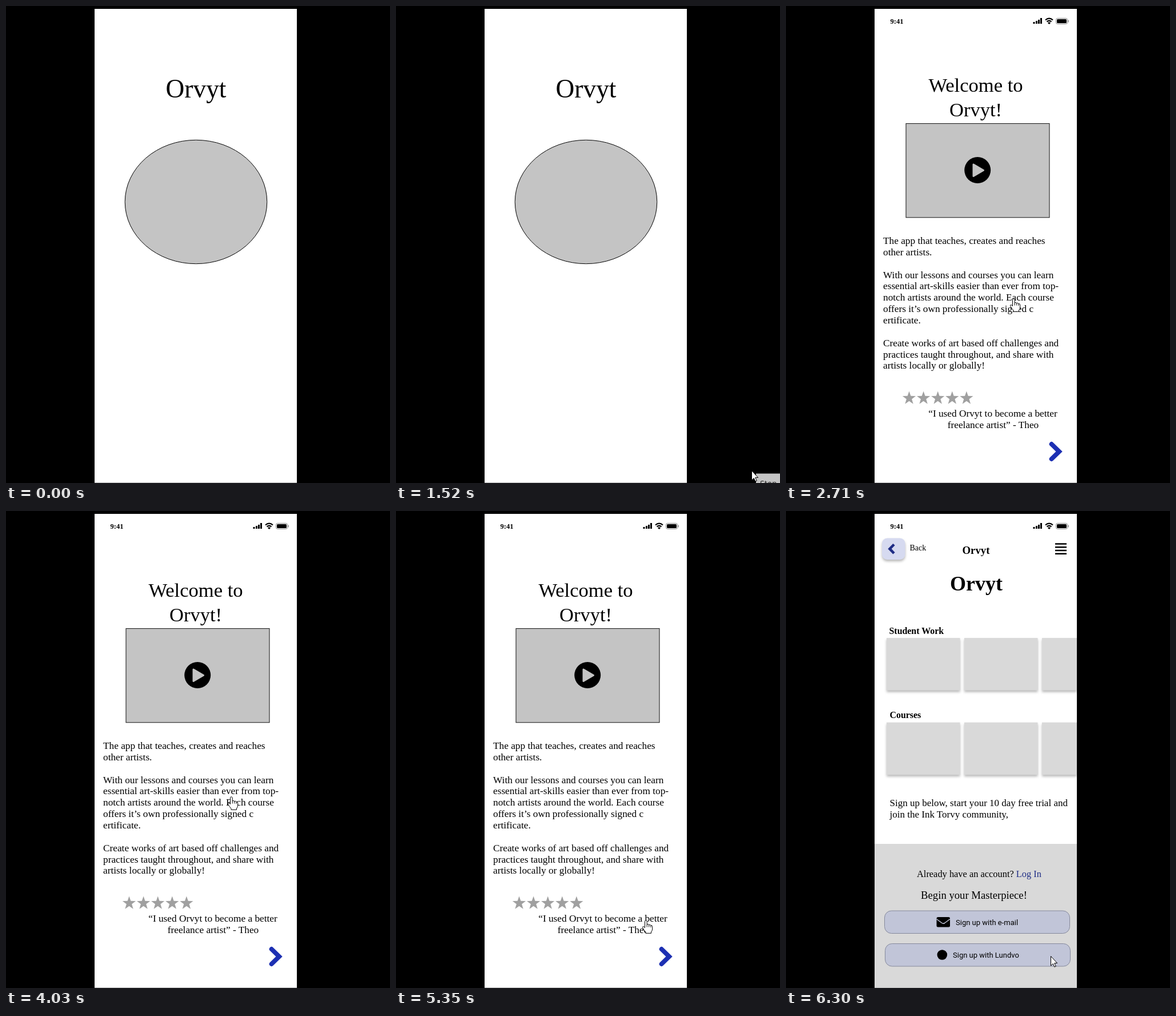
Recreate the animation shown at these times as an HTML page. Size 672x834 px, loop 8000 ms.

```html
<!DOCTYPE html>
<html lang="en">
<head>
<meta charset="utf-8">
<title>App prototype walkthrough</title>
<style>
  html, body { margin: 0; width: 100%; height: 100%; overflow: hidden; background: #000; }
  svg { display: block; width: 672px; height: 834px; }
  text { font-family: "Liberation Serif", "Times New Roman", serif; white-space: pre; }
  .body { font-size: 17.3px; }
  .mid { text-anchor: middle; }
  .bold { font-weight: bold; }
  .title { font-size: 34.6px; }
  .label { font: 13px Roboto, sans-serif; }
  .tip { font: 14px "Open Sans", sans-serif; }
  .tile { fill: #d9d9d9; filter: drop-shadow(0 3px 2px rgba(0, 0, 0, .28)); }
  .button { fill: #c1c5d8; stroke: #85899c; }
  .pointer { fill: #fff; stroke: #000; stroke-width: 1; stroke-linejoin: round; }
</style>
</head>
<body>
<svg viewBox="0 0 672 834">
  <rect width="672" height="834"/>
  <rect x="155" y="5" width="354" height="828" fill="#fff"/>
  <path d="M155 833.5H509" stroke="#b5b5b5"/>

  <g id="splash">
    <text class="mid" x="332.5" y="160" font-size="45.4">Orvyt</text>
    <ellipse cx="332.5" cy="342.5" rx="124.3" ry="108.2" fill="#c4c4c4" stroke="#000"/>
  </g>

  <g id="status">
    <text class="bold" x="182.5" y="31" font-size="12.5">9:41</text>
    <path d="M434 28V31M438.5 26V31M442.5 24V31M446.5 21V31" stroke="#000" stroke-width="3"/>
    <path d="M454 24.5Q460.5 18.8 467 24.5M456.5 27.5Q460.5 24 464.5 27.5" fill="none" stroke="#000" stroke-width="2.2"/>
    <path d="M457.9 29.4Q460.5 27.2 463.1 29.4L460.5 32Z"/>
    <rect x="472.5" y="21.5" width="20" height="10" rx="2.8" fill="none" stroke="#888"/>
    <rect x="474" y="23" width="17" height="7" rx="1.5"/>
    <path d="M494.3 24.5V28.5" stroke="#888" stroke-width="1.3"/>
  </g>

  <g id="welcome">
    <text class="title mid" x="332" y="150">Welcome to</text>
    <text class="title mid" x="332" y="193">Orvyt!</text>
    <rect x="210" y="205.5" width="251" height="164.3" fill="#c4c4c4" stroke="#222" stroke-width="1.1"/>
    <circle cx="335.2" cy="287" r="23"/>
    <path d="M328 277V297.500L345.500 287.200Z" fill="#c4c4c4" stroke="#c4c4c4" stroke-width="3" stroke-linejoin="round"/>
    <g id="copy"></g>
    <g id="stars" fill="#a0a0a0"></g>
    <text class="body mid" x="362" y="718">“I used Orvyt to become a better</text>
    <text class="body mid" x="362.5" y="738">freelance artist” - Theo</text>
    <path d="M464.700 766L478 779L464.700 792" fill="none" stroke="#1d30b3" stroke-width="8" stroke-linejoin="miter" stroke-linecap="round"/>
  </g>

  <g id="signup">
    <rect x="168" y="47.500" width="40.500" height="37.500" rx="9" fill="#d6daf0" style="filter:drop-shadow(0 3px 2px rgba(0,0,0,.28))"/>
    <path d="M189 58.500L181.500 66.200L189 74" fill="none" stroke="#1f2d85" stroke-width="4.600"/>
    <text x="216.500" y="69" font-size="14">Back</text>
    <text class="bold mid" x="332.500" y="75" font-size="18.800">Orvyt</text>
    <path d="M471 57.500H491M471 63.200H491M471 69H491M471 74.800H491" stroke="#000" stroke-width="2.600"/>
    <text class="bold mid" x="333" y="139" font-size="36">Orvyt</text>
    <text class="bold" x="180.500" y="215" font-size="15.900">Student Work</text>
    <text class="bold" x="181.500" y="362" font-size="15.900">Courses</text>
    <g id="tiles"></g>
    <text x="181.500" y="516" font-size="17">Sign up below, start your 10 day free trial and</text>
    <text x="181.500" y="536" font-size="17">join the Ink Torvy community,</text>
    <rect x="155" y="582" width="354" height="251" fill="#d9d9d9"/>
    <text x="229" y="640" font-size="16.400">Already have an account? <tspan fill="#1f2d85">Log In</tspan></text>
    <text class="mid" x="329" y="678" font-size="18.700">Begin your Masterpiece!</text>
    <rect class="button" x="172.500" y="699" width="324" height="39.500" rx="12"/>
    <rect class="button" x="173.500" y="756.500" width="324" height="39.500" rx="12"/>
    <rect x="263.500" y="710" width="23.500" height="17.500" rx="2.500"/>
    <path d="M263.500 713.500L273 720.500Q275.200 722 277.500 720.500L287 713.500" fill="none" stroke="#c1c5d8" stroke-width="1.500"/>
    <circle cx="273.300" cy="776" r="8.800"/>
    <text class="label" x="297" y="723.500">Sign up with e-mail</text>
    <text class="label" x="292" y="781">Sign up with Lundvo</text>
  </g>

  <g id="tooltip">
    <rect x="630" y="817.500" width="42" height="17" fill="#c4c4c4"/>
    <text class="tip" x="637" y="839.500" fill="#222">Stop</text>
  </g>

  <circle id="press" cx="463" cy="778" r="16" fill="#ff0" fill-opacity=".5"/>
  <g id="cursor">
    <path id="arrow" class="pointer" d="M0 0V16.500L3.800 13L6.300 18.700L8.800 17.600L6.300 12H11.200Z"/>
    <g id="hand" class="pointer">
      <path d="M-2 13V2Q-2 .3 -.2 .3T1.700 2V7.500Q3.500 6 5.200 8Q7.200 7 8.500 9Q10.800 8.500 11.200 11V15.500Q11 18.500 9 20.500V22.800H-.5V20.800Q-3.500 17.500 -6 13Q-6 10.500 -4 11.200Z"/>
      <path d="M1.700 7.500V12M5.200 8V12M8.500 9V12.500" fill="none"/>
    </g>
  </g>
</svg>
<script>
const LOOP = 8000;
const SWAP = { welcome: 2640, signup: 6300 };
const PRESS = 6170;

// Cursor moves: start, end, number of steps, from, to, vertical bow
const MOVES = [
  [1520, 2020, 8, [625, 832], [580, 513], 0],
  [2220, 2710, 8, [580, 513], [398, 511], -5],
  [4030, 4450, 7, [398, 511], [351.5, 355], 0],
  [4650, 5420, 12, [351.5, 355], [440.5, 728], 0],
  [5490, 5910, 7, [440.5, 728], [463, 778], 0]
];
// Tooltip opacity by start time
const TOOLTIP = [[0, 0], [1120, .5], [1190, 1], [1590, .5], [1660, 0]];

const COPY = [
  'The app that teaches, creates and reaches', 'other artists.', '',
  'With our lessons and courses you can learn',
  'essential art-skills easier than ever from top-',
  'notch artists around the world. Each course',
  'offers it’s own professionally signed c', 'ertificate.', '',
  'Create works of art based off challenges and',
  'practices taught throughout, and share with',
  'artists locally or globally!'
];

const byId = id => document.getElementById(id);
const show = (id, on) => byId(id).style.display = on ? '' : 'none';

function add(parent, tag, attrs, text = '') {
  const node = document.createElementNS(byId(parent).namespaceURI, tag);
  for (const [key, value] of Object.entries(attrs)) node.setAttribute(key, value);
  node.textContent = text;
  byId(parent).append(node);
}

COPY.forEach((line, i) =>
  add('copy', 'text', { class: 'body', x: 170, y: 416 + 19.85 * i }, line));

for (let i = 0; i < 5; i++) {
  const points = Array.from({ length: 10 }, (_, k) => {
    const r = k % 2 ? 4.9 : 12.2, a = k * Math.PI / 5;
    return [215.5 + 25.1 * i + r * Math.sin(a), 685.8 - r * Math.cos(a)];
  });
  add('stars', 'polygon', { points: points.join(' ') });
}

for (const y of [222, 369.7])
  for (const x of [176, 312, 448])
    add('tiles', 'rect', { class: 'tile', x, y, width: Math.min(128.5, 509 - x), height: 91.5 });

const ease = p => .25 * p + .75 * p * p * (3 - 2 * p);

function cursorAt(t) {
  const move = MOVES.filter(m => t >= m[0]).pop();
  if (!move) return null;
  const [start, end, steps, from, to, bow] = move;
  const step = Math.floor((t - start) / (end - start) * (steps - 1) + 1e-6) + 1;
  const p = ease(Math.min(1, step / steps));
  return [
    from[0] + (to[0] - from[0]) * p,
    from[1] + (to[1] - from[1]) * p + bow * 4 * p * (1 - p)
  ];
}

function render(t) {
  const welcome = t >= SWAP.welcome, signup = t >= SWAP.signup;
  show('splash', !welcome);
  show('status', welcome);
  show('welcome', welcome && !signup);
  show('signup', signup);
  show('press', t >= PRESS && !signup);
  show('hand', welcome && !signup);
  show('arrow', !welcome || signup);
  byId('tooltip').style.opacity = TOOLTIP.filter(s => t >= s[0]).pop()[1];
  const at = cursorAt(t);
  show('cursor', at);
  if (at) byId('cursor').setAttribute('transform', `translate(${at.map(v => Math.round(v) + .5)})`);
}

const begin = performance.now();
function tick() {
  render((performance.now() - begin) % LOOP);
  requestAnimationFrame(tick);
}
tick();
</script>
</body>
</html>
```
